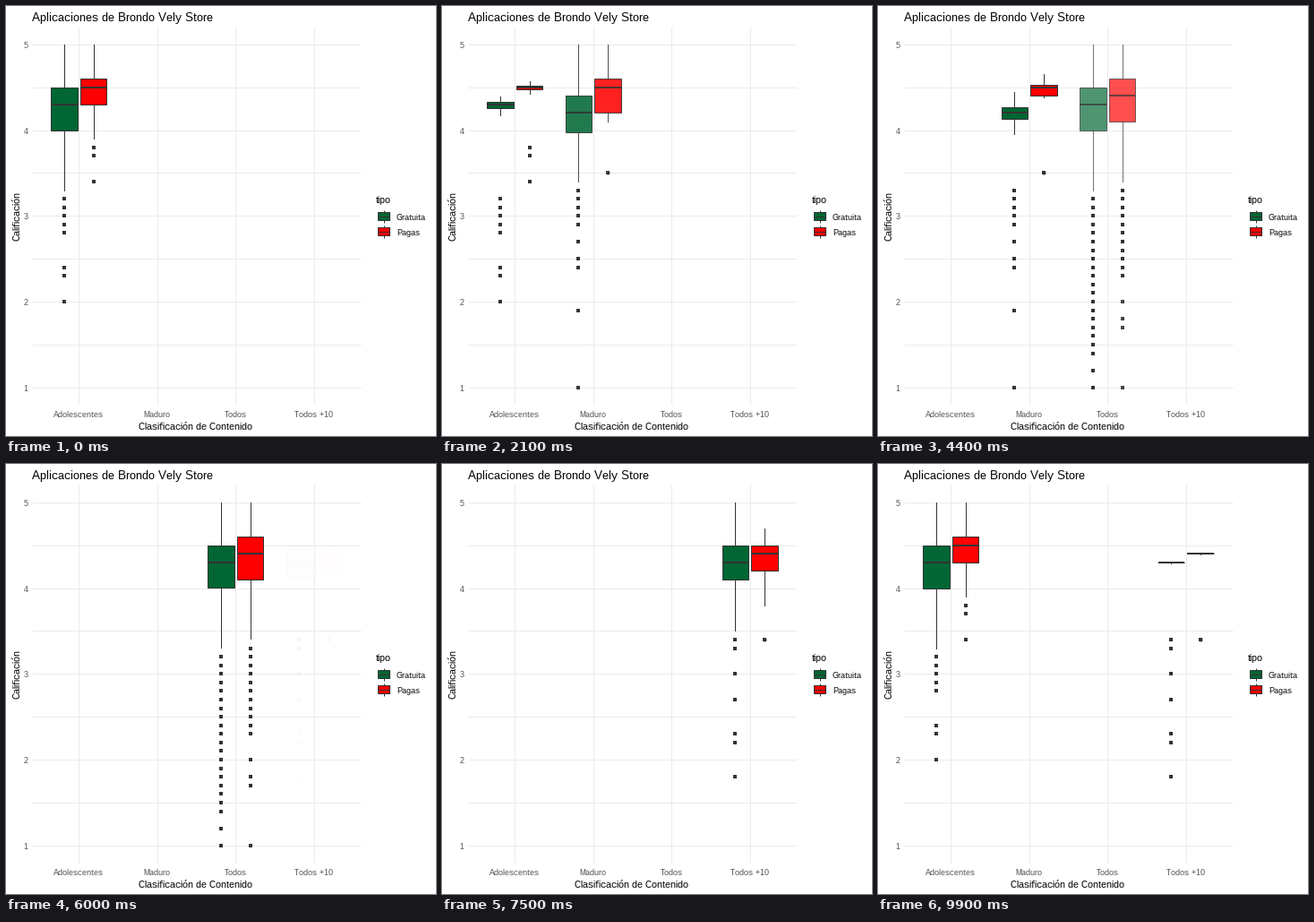
Animation, 480 px wide and 480 px high, one loop 10 s. Source, as a matplotlib script:

```python
import math

import numpy as np
import matplotlib.pyplot as plt
from matplotlib.animation import FuncAnimation
from matplotlib.colors import to_rgba
from matplotlib.patches import Rectangle

SIZE, DPI = 480, 100
PT = 72 / DPI  # points per pixel
FRAMES, INTERVAL = 100, 100

INK, GRID, TICK = "#333333", "#EBEBEB", "#4D4D4D"
GREEN, RED = "#006633", "#FF0000"
LEFT, TOP, BOTTOM = 28.78, 23, 445
STEP = 87.49
RIGHT = LEFT + 4.2 * STEP
CATEGORIES = ["Adolescentes", "Maduro", "Todos", "Todos +10"]

# Each category holds, then gives way to the next at the end of its share
STARTS = np.ceil(np.linspace(8, 84, len(CATEGORIES)))
SHARE = FRAMES // len(CATEGORIES)


def boxplot(q1, median, q3, peak, *runs, low=1.0, high=5.0):
    """Tukey whiskers from the quartiles; outliers in runs of 0.1.

    The number of coinciding outliers falls off from `peak` downwards.
    """
    reach = 1.5 * (q3 - q1)
    low = max(low, math.ceil(round((q1 - reach) * 10, 6)) / 10)
    high = min(high, math.floor(round((q3 + reach) * 10, 6)) / 10)
    values = np.concatenate([
        np.arange(round(run[0] * 10), round(run[-1] * 10) - 1, -1) / 10
        for run in runs])
    counts = np.maximum(1, peak * np.exp(-1.3 * (values[0] - values)))
    return (low, q1, median, q3, high), values, counts


# Free and paid apps of each category
BOXES = [
    (boxplot(4.0, 4.3, 4.5, 6, (3.2, 2.8), (2.4, 2.3), (2.0,)),
     boxplot(4.3, 4.5, 4.6, 2, (3.8, 3.7), (3.4,))),
    (boxplot(3.975, 4.2, 4.4, 6, (3.3, 2.9), (2.7,), (2.5, 2.4), (1.9,),
             (1.0,)),
     boxplot(4.2, 4.5, 4.6, 1, (3.5,), low=4.1)),
    (boxplot(4.0, 4.3, 4.5, 48, (3.2, 1.4), (1.2,), (1.0,)),
     boxplot(4.1, 4.4, 4.6, 6, (3.3, 2.3), (2.0,), (1.8, 1.7), (1.0,))),
    (boxplot(4.1, 4.3, 4.5, 3, (3.4, 3.3), (3.0,), (2.7,), (2.3, 2.2),
             (1.8,)),
     boxplot(4.2, 4.4, 4.5, 2, (3.4,), high=4.7)),
]

plt.rcParams["font.family"] = "Liberation Sans"
plt.rcParams["text.hinting"] = "native"
plt.rcParams["text.hinting_factor"] = 1
fig = plt.figure(figsize=(SIZE / DPI, SIZE / DPI), dpi=DPI, facecolor="white")
ax = fig.add_axes([0, 0, 1, 1])
ax.set_xlim(0, SIZE)
ax.set_ylim(SIZE, 0)
ax.axis("off")


def x_at(category):
    return LEFT + (0.6 + category) * STEP


def y_at(rating):
    return 42.8 + 95.75 * (5 - rating)


def line(x0, y0, x1, y1, color=INK, width=1, cap="butt", **kw):
    return ax.plot([x0, x1], [y0, y1], color=color, lw=width * PT,
                   solid_capstyle=cap, **kw)[0]


def box(x0, y0, x1, y1, fill, **kw):
    return ax.add_patch(Rectangle((x0, y0), x1 - x0, y1 - y0, facecolor=fill,
                                  edgecolor=INK, lw=PT, **kw))


def text(x, y, label, size, color="black", ha="left", **kw):
    ax.text(x, y, label, fontsize=size * PT, color=color, ha=ha,
            va="baseline", **kw)


def draw_static():
    for rating in np.arange(1, 5.1, 0.5):
        line(LEFT, y_at(rating), RIGHT, y_at(rating), GRID, zorder=0)
    for rating in range(1, 6):
        text(24.5, round(y_at(rating)) + 4, str(rating), 9, TICK, "right")
    for i, name in enumerate(CATEGORIES):
        line(x_at(i), TOP, x_at(i), BOTTOM, GRID, zorder=0)
        text(x_at(i), 459, name, 9, TICK, "center")
    text(29, 17, "Aplicaciones de Brondo Vely Store", 13)
    text(212, 473, "Clasificación de Contenido", 11, ha="center")
    text(15, 262.5, "Calificación", 11, rotation=90, rotation_mode="anchor")
    text(413, 220, "tipo", 11)
    for y, name, fill in [(234.6, "Gratuita", GREEN), (251.8, "Pagas", RED)]:
        line(421.6, y - 6.9, 421.6, y + 6.9)
        box(415.2, y - 4.4, 428.2, y + 4.4, fill, zorder=3)
        line(415.2, y, 428.2, y, zorder=4)
        text(436, round(y + 4.2), name, 9)


def draw_outliers(x, values, counts, alpha):
    # Coinciding points build up opacity; rims overlap their discs
    colors = [to_rgba(INK, 1 - (1 - alpha) ** n) for n in counts]
    xs, ys = [round(x)] * len(values), [round(y_at(v)) for v in values]
    disc = ax.scatter(xs, ys, s=(4 * PT) ** 2, c=colors, linewidths=0,
                      antialiaseds=False, zorder=2)
    rim = ax.scatter(xs, ys, s=(3 * PT) ** 2, facecolors="none",
                     edgecolors=colors, linewidths=PT, antialiaseds=False,
                     zorder=2)
    return [disc, rim]


def draw_boxplot(x, fill, summary, values, counts, alpha, shrink):
    median = summary[2]
    low, q1, mid, q3, high = (
        y_at(median + (v - median) * (1 - shrink)) for v in summary)
    half = 0.16875 * STEP
    x0, x1 = x - half, x + half
    whisker = dict(cap="projecting", alpha=alpha, zorder=2)
    return draw_outliers(x, values, counts, alpha) + [
        line(x, high, x, q3, **whisker),
        line(x, q1, x, low, **whisker),
        box(x0, q3, x1, q1, fill, alpha=alpha, zorder=3),
        line(x0, mid, x1, mid, width=2, alpha=alpha, zorder=4),
    ]


def draw_category(index, alpha=1.0, shrink=0.0):
    artists = []
    for side, fill, data in zip((-1, 1), (GREEN, RED), BOXES[index]):
        x = x_at(index) + side * 0.1875 * STEP
        artists += draw_boxplot(x, fill, *data, alpha, shrink)
    return artists


def sine_in_out(t):
    return (1 - math.cos(math.pi * t)) / 2


live = []


def update(frame):
    while live:
        live.pop().remove()
    # A category still holds on the frame where its predecessor has left
    index = frame // SHARE
    start, end = STARTS[index], SHARE * (index + 1)
    if frame <= start:
        live.extend(draw_category(index))
    else:
        progress = sine_in_out((frame - start) / (end - start))
        live.extend(draw_category(index, shrink=progress))
        live.extend(draw_category((index + 1) % len(CATEGORIES),
                                  alpha=progress))
    return live


draw_static()
anim = FuncAnimation(fig, update, frames=FRAMES, interval=INTERVAL,
                     repeat=True, repeat_delay=0, blit=False)
plt.show()
```
